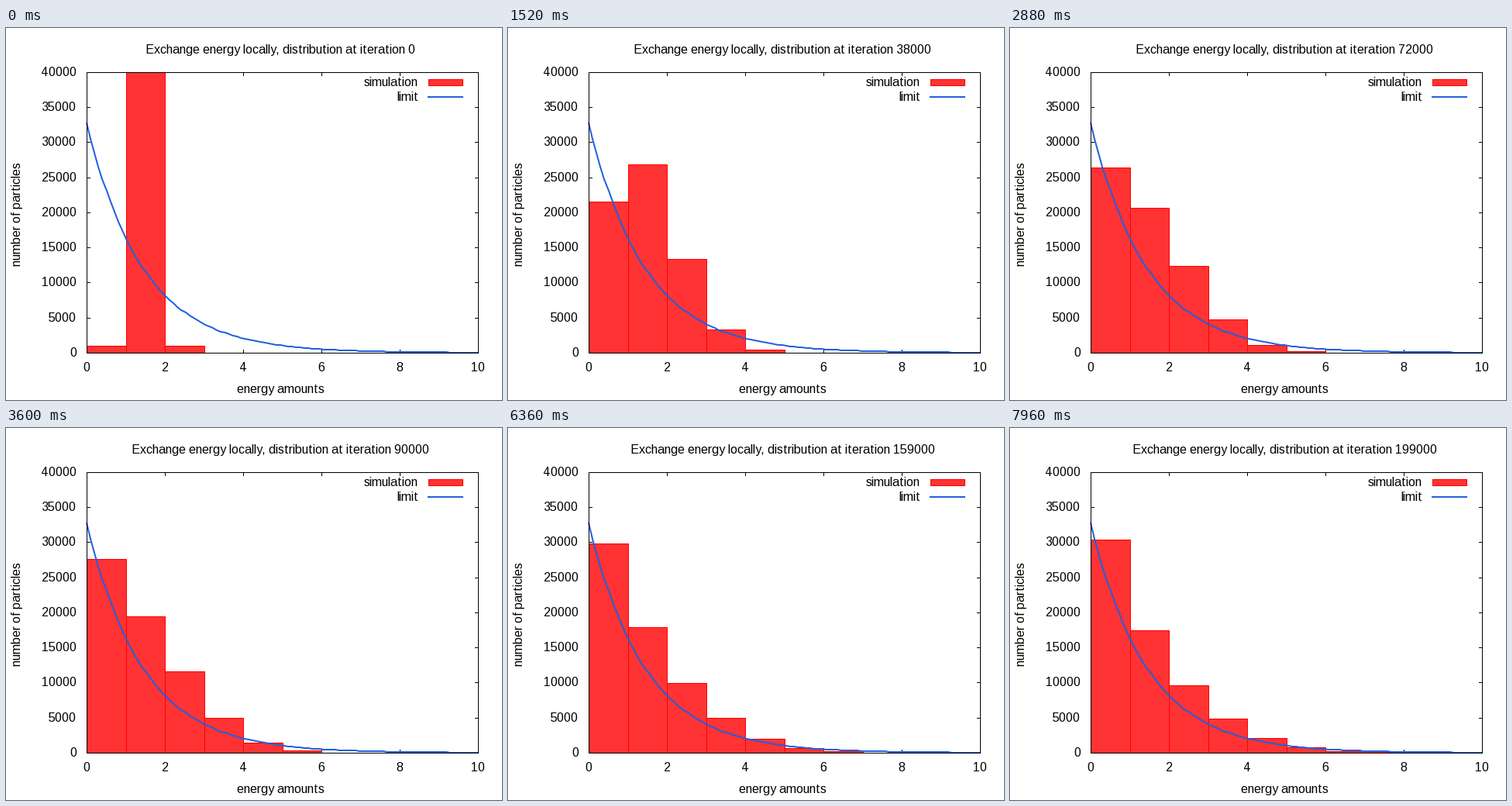
These frames come from a looping animation (640x480 px, 8 s). A matplotlib script:

```python
import random

import numpy as np
import matplotlib.pyplot as plt
from matplotlib.animation import FuncAnimation
from matplotlib.patches import Rectangle

plt.rcParams.update({
    "font.family": "Liberation Sans",
    "font.size": 16,
    "text.hinting": "force_autohint",
    "text.hinting_factor": 1,
    "path.simplify": False,
    "toolbar": "None",
})

FRAMES, INTERVAL = 200, 40
SIDE = 256
PARTICLES = SIDE * SIDE
STEP = 1000
LEFT, RIGHT, TOP, BOTTOM = 104, 609, 57, 419
RED, FILL, BLUE = "#ff0000", "#ff3333", "#2060dd"
BARS = 10


def simulate():
    """Particles on a square grid each start with one unit of energy; at every
    exchange a random one that has energy hands a unit to a neighbour."""
    rnd = random.Random(1).random
    energy = [1] * PARTICLES
    shifts = (1, -1, SIDE, -SIDE)
    history = []
    for _ in range(FRAMES):
        for _ in range(STEP):
            i = int(rnd() * PARTICLES)
            while not energy[i]:
                i = int(rnd() * PARTICLES)
            energy[i] -= 1
            energy[(i + shifts[int(rnd() * 4)]) % PARTICLES] += 1
        history.append(np.bincount(energy, minlength=BARS)[:BARS])
    return history


def px(x):
    return np.floor(LEFT + x * (RIGHT - LEFT) / 10 + 0.5)


def py(y):
    return BOTTOM - np.floor(y * (BOTTOM - TOP) / 40000 + 0.5)


fig = plt.figure(figsize=(640 / 72, 480 / 72), dpi=72, facecolor="white")
ax = fig.add_axes([0, 0, 1, 1])
ax.set(xlim=(0, 640), ylim=(480, 0))
ax.axis("off")


def block(x0, y0, x1, y1, color, z):
    """Fill whole pixels from (x0, y0) to (x1, y1), both included."""
    return ax.add_patch(Rectangle((x0, y0), x1 - x0 + 1, y1 - y0 + 1, lw=0,
                                  fc=color, antialiased=False, zorder=z))


def label(x, y, text, ha):
    return ax.text(x, y, text, ha=ha, va="baseline", color="black", zorder=6)


# Ticks and their labels
for v in range(0, 11, 2):
    x = px(v)
    block(x, TOP, x, TOP + 4, "black", 1)
    block(x, BOTTOM - 4, x, BOTTOM, "black", 1)
    label(x, 443, str(v), "center")
for v in range(0, 40001, 5000):
    y = py(v)
    block(LEFT, y, LEFT + 4, y, "black", 1)
    block(RIGHT - 4, y, RIGHT, y, "black", 1)
    label(91, y + 5, str(v), "right")

# Frame of the plot
for edge in ((LEFT, TOP, RIGHT, TOP), (LEFT, BOTTOM, RIGHT, BOTTOM),
             (LEFT, TOP, LEFT, BOTTOM), (RIGHT, TOP, RIGHT, BOTTOM)):
    block(*edge, "black", 5)

label(354, 471, "energy amounts", "center")
ax.text(22, 240, "number of particles", rotation=90, ha="right", va="center",
        zorder=6)
title = label(354, 33, "", "center")

# Legend
label(532, 75, "simulation", "right")
label(532, 94, "limit", "right")
block(545, 66, 589, 74, RED, 2)
block(546, 67, 588, 73, FILL, 3)
block(544, 88, 589, 89, BLUE, 4)

# Limit curve
xs = np.linspace(0, 10, 100)
ax.plot(px(xs), py(PARTICLES / 2 * 0.5 ** xs), color=BLUE, lw=2, snap=False,
        solid_capstyle="butt", zorder=4)

bars = []
for n in range(BARS):
    x0, x1 = px(n), px(n + 1)
    bars.append((block(x0, BOTTOM, x1, BOTTOM, RED, 2),
                 block(x0 + 1, BOTTOM, x1 - 1, BOTTOM, FILL, 3)))

counts = simulate()


def draw(k):
    title.set_text("Exchange energy locally, distribution at iteration %d" % (k * STEP))
    for (outer, inner), count in zip(bars, counts[k]):
        top = max(py(count), TOP)
        outer.set_y(top)
        outer.set_height(BOTTOM - top + 1)
        inner.set_y(top + 1)
        inner.set_height(max(BOTTOM - top - 1, 0))
    return []


anim = FuncAnimation(fig, draw, frames=FRAMES, interval=INTERVAL, repeat=True,
                     repeat_delay=0, blit=False)
plt.show()
```
